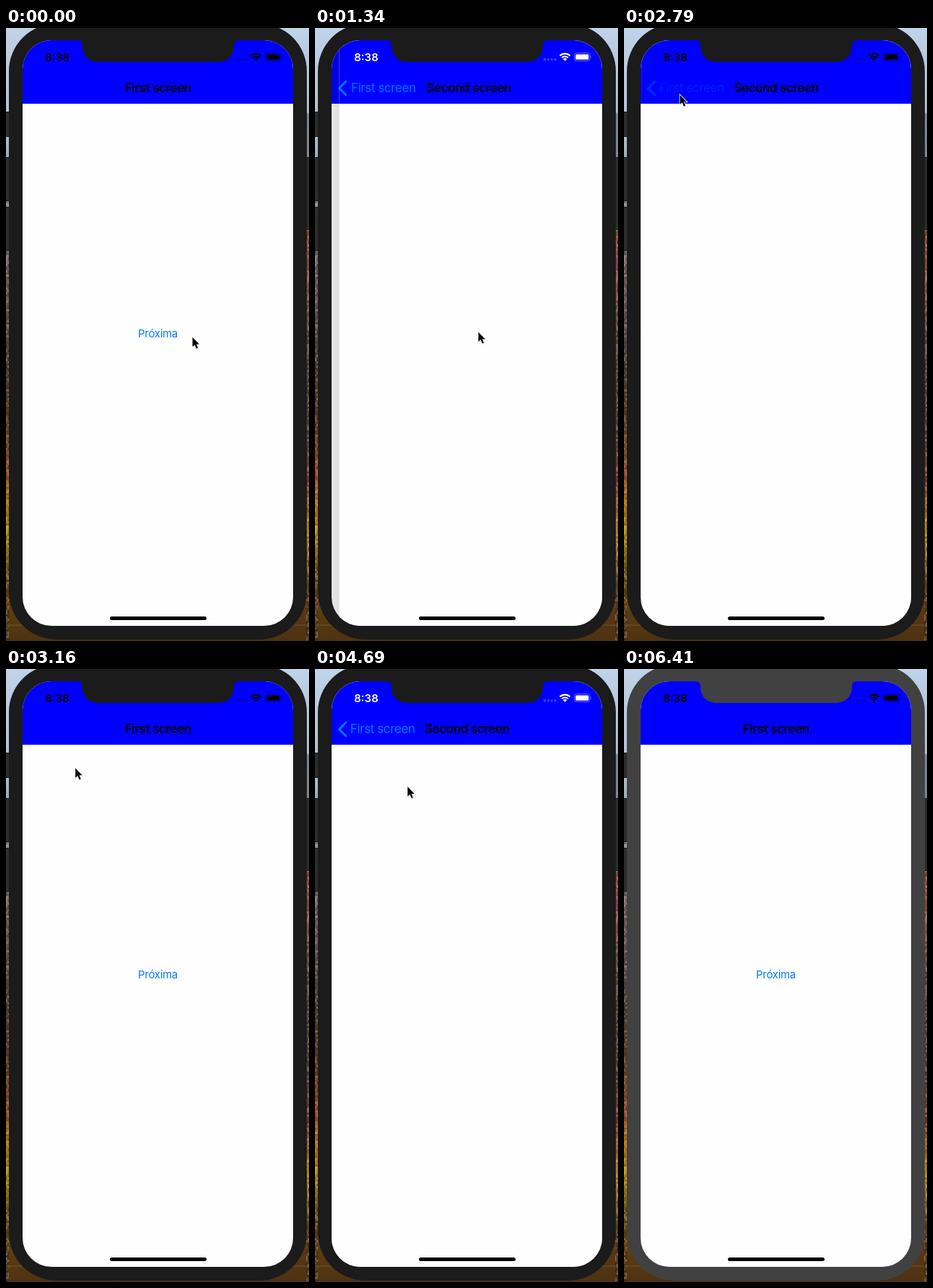
Animation of 420x850 px, one loop 6510 ms. Source, as an HTML page:

```html
<!DOCTYPE html>
<html lang="en">
<head>
<meta charset="utf-8">
<title>Navigation demo</title>
<style>
  html, body { margin: 0; width: 100%; height: 100%; overflow: hidden; background: #000; }
  svg { display: block; width: 420px; height: 850px; }
  text { font-family: Inter, "Open Sans", sans-serif; }
  .title, .label { font-size: 17px; letter-spacing: -0.4px; text-anchor: middle; }
  .title { font-weight: 600; }
  .label { fill: #007aff; }
  .clock { font-size: 15px; font-weight: 600; text-anchor: middle; }
  .link { font-size: 15px; letter-spacing: -0.3px; fill: #007aff; text-anchor: middle; }
</style>
</head>
<body>
<svg viewBox="0 0 420 850">
  <defs>
    <linearGradient id="bgLeft" gradientUnits="userSpaceOnUse" x1="0" y1="0" x2="0" y2="850"></linearGradient>
    <linearGradient id="bgRight" gradientUnits="userSpaceOnUse" x1="0" y1="0" x2="0" y2="850"></linearGradient>
    <linearGradient id="edge">
      <stop offset="0" stop-opacity="0"/>
      <stop offset=".4" stop-opacity=".04"/>
      <stop offset="1" stop-opacity=".2"/>
    </linearGradient>
    <clipPath id="screen"><rect x="23" y="17" width="375" height="812" rx="40"/></clipPath>
  </defs>

  <rect width="210" height="850" fill="url(#bgLeft)"/>
  <rect x="210" width="210" height="850" fill="url(#bgRight)"/>
  <g id="grain"></g>
  <path d="M0 828H420" stroke="#8a6a3c" stroke-opacity=".6"/>

  <g fill="#2d2d2d" stroke="#151515">
    <rect x="-4" y="116.500" width="9" height="34"/>
    <rect x="-4" y="179.500" width="9" height="60"/>
    <rect x="-4" y="248.500" width="9" height="60"/>
    <rect x="415" y="179.500" width="9" height="100"/>
  </g>
  <rect id="bezel" x="4" y="-6" width="413" height="854" rx="66"/>

  <g clip-path="url(#screen)">
    <rect x="23" y="17" width="375" height="812" fill="#fefefe"/>
    <text id="link" class="link" y="428.500">Próxima</text>
    <rect x="23" y="17" width="375" height="88" fill="#00f"/>
    <rect id="dim" x="23" y="17" width="375" height="812"/>
    <g id="page">
      <rect id="shade" x="-9" y="17" width="9" height="812" fill="url(#edge)"/>
      <rect y="17" width="375" height="812" fill="#fefefe"/>
      <rect y="17" width="375" height="88" fill="#00f"/>
    </g>
    <path id="chevron" d="M42.700 74.300L33.500 83.500L42.700 92.700" fill="none" stroke="#007aff" stroke-width="3" stroke-linecap="round" stroke-linejoin="round"/>
    <text id="back" class="label" y="89.300">First screen</text>
    <text id="first" class="title" y="89.300">First screen</text>
    <text id="second" class="title" y="89.300">Second screen</text>
    <g id="status">
      <text class="clock" x="71" y="45.500">8:38</text>
      <g fill-opacity=".25">
        <circle cx="318.500" cy="43.700" r="1.800"/><circle cx="323.300" cy="43.700" r="1.800"/>
        <circle cx="328.100" cy="43.700" r="1.800"/><circle cx="332.900" cy="43.700" r="1.800"/>
      </g>
      <path d="M346.500 45.800L343.800 43A3.900 3.900 0 0 1 349.200 43Z"/>
      <g fill="none" stroke-width="2.100">
        <path d="M342.100 41.300A6.300 6.300 0 0 1 350.900 41.300"/>
        <path d="M339.400 38.500A10.100 10.100 0 0 1 353.600 38.500"/>
      </g>
      <rect x="359.500" y="34.700" width="21.500" height="10.800" rx="2.900" fill="none" stroke-opacity=".4"/>
      <rect x="361.200" y="36.400" width="18.100" height="7.400" rx="1.500"/>
      <path d="M382.200 38.300Q383.800 40.100 382.200 41.900Z" fill-opacity=".5"/>
    </g>
    <rect x="144" y="816" width="134" height="5" rx="2.500"/>
  </g>
  <path id="notch" d="M99 16V17Q106 17 106 24C106 38 115 47 129 47H293C307 47 316 38 316 24Q316 17 323 17V16Z"/>

  <g id="cursor">
    <path d="M.500 1.500V15.500L3.700 12.500L6 18L8.600 16.900L6.300 11.500H10.800Z" opacity=".22"/>
    <path d="M.500 .700V14L3.600 11.200L5.900 16.500L8.100 15.600L5.900 10.400H10Z" stroke="#fff" stroke-width="1.600" paint-order="stroke"/>
  </g>
</svg>
<script>
const LOOP = 6510, WIDTH = 375, LEFT = 23;
const $ = id => document.getElementById(id);
const ids = ["bezel", "notch", "link", "dim", "page", "shade", "chevron", "back", "first", "second", "status", "cursor"];
const el = Object.fromEntries(ids.map(id => [id, $(id)]));
const clamp = x => Math.min(1, Math.max(0, x));
const mix = (a, b, k) => a + (b - a) * k;
const smooth = x => x * x * (3 - 2 * x);
const set = (node, attrs) => { for (const k in attrs) node.setAttribute(k, attrs[k]); };

function make(tag, attrs, parent) {
  const node = document.createElementNS("http://www.w3.org/2000/svg", tag);
  set(node, attrs);
  parent.append(node);
}

// Desktop behind the phone: [y, colour] stops
const sides = {
  bgLeft: [[0, "#bfd3ea"], [150, "#aebccb"], [245, "#80858c"], [310, "#6b625f"], [400, "#5a504a"], [480, "#4a3628"],
    [560, "#6e3f1f"], [620, "#a0481f"], [660, "#b87a10"], [700, "#b88a08"], [760, "#6b4a12"], [850, "#4e3212"]],
  bgRight: [[0, "#bfd3ea"], [117, "#aabacc"], [119, "#75828f"], [180, "#7f858d"], [285, "#9a4f38"], [350, "#87493a"],
    [430, "#5a4038"], [560, "#4a3a30"], [630, "#8a3a20"], [700, "#b88a10"], [780, "#5e3a18"], [850, "#4e3212"]]
};
for (const id in sides)
  for (const [y, color] of sides[id]) make("stop", { offset: y / 850, "stop-color": color }, $(id));

let seed = 7;
const rand = () => (seed = seed * 16807 % 2147483647) / 2147483647;
for (let y = 240; y < 848; y += 3)
  for (const x of [0, 2, 416, 418])
    make("rect", { x, y, width: 2, height: 3, fill: rand() < .6 ? "#000" : "#fff", opacity: rand() * .25 }, $("grain"));

// Screen changes: start, time of press, direction and spring rate
const moves = [
  { at: 1040, press: 930, push: true, rate: .018 },
  { at: 2788, press: 2640, push: false, rate: .026 },
  { at: 4097, press: 3940, push: true, rate: .018 },
  { at: 5334, press: 5220, push: false, rate: .018 }
];

// Pointer tip: [time, x, y]
const path = [
  [0, 258, 428], [390, 226, 421], [1650, 226, 421], [2320, 77, 97], [2380, 77, 92], [3020, 77, 92],
  [3640, 219, 433], [3760, 220, 428], [4200, 220, 428], [4690, 128, 163], [4750, 120, 141],
  [5040, 104, 90], [5220, 104, 90], [5390, 114, 145], [5680, 424, 330]
];

function pointer(t) {
  let i = 0;
  while (i < path.length - 2 && t >= path[i + 1][0]) i++;
  const [t0, x0, y0] = path[i], [t1, x1, y1] = path[i + 1];
  const k = clamp((t - t0) / (t1 - t0));
  const e = t1 - t0 > 300 && t1 !== 4690 ? smooth(k) : k;
  return [mix(x0, x1, e), mix(y0, y1, e)];
}

// Share of the second screen that is still off to the right
function away(t) {
  const m = moves.filter(m => t >= m.at).pop();
  if (!m) return 1;
  const x = (t - m.at) * m.rate;
  let rest = (1 + x) * Math.exp(-x);
  if (rest < .002) rest = 0;
  return m.push ? rest : 1 - rest;
}

function draw(t) {
  const u = away(t), s = 1 - u;
  const slide = .3 * u + .7 * smooth(u);
  const now = moves.filter(m => t >= m.press).pop();
  const pushed = now && now.push;
  const popping = now && !now.push;
  const started = moves.filter(m => t >= m.at - 20).pop();
  const ink = started && started.push ? "#fff" : "#000";
  const idle = t >= 6410;

  for (const part of [el.bezel, el.notch]) set(part, { fill: idle ? "#414141" : "#1b1b1b" });

  set(el.link, { x: 210.5 - .3 * WIDTH * s, opacity: pushed ? mix(1, .23, clamp((t - now.press) / 60)) : 1 });
  set(el.dim, { opacity: .1 * s });
  set(el.page, { transform: `translate(${LEFT + WIDTH * u} 0)`, visibility: u < 1 ? "visible" : "hidden" });
  set(el.shade, { opacity: clamp(u * 6) * clamp(s * 20) });

  const center = mix(93.7, 210.8, slide);
  const glow = popping ? mix(.35, .65, clamp((t - now.at) / 80)) : 1;
  set(el.chevron, { opacity: clamp((s - .15) / .85) * glow });
  set(el.back, { x: center, opacity: clamp((s - .2) / .8) * (popping ? .25 : 1) });
  set(el.first, { x: center, opacity: clamp((u - .03) / .85) });
  set(el.second, { x: 210.8 + 230 * slide, opacity: clamp((s - .08) / .6) });
  set(el.status, { fill: ink, stroke: "none" });
  for (const line of el.status.querySelectorAll('[fill="none"]')) set(line, { stroke: ink });

  const [x, y] = pointer(t);
  set(el.cursor, { transform: `translate(${x} ${y})`, visibility: idle ? "hidden" : "visible" });
}

const begin = performance.now();
function tick() {
  draw((performance.now() - begin) % LOOP);
  requestAnimationFrame(tick);
}
tick();
</script>
</body>
</html>
```
